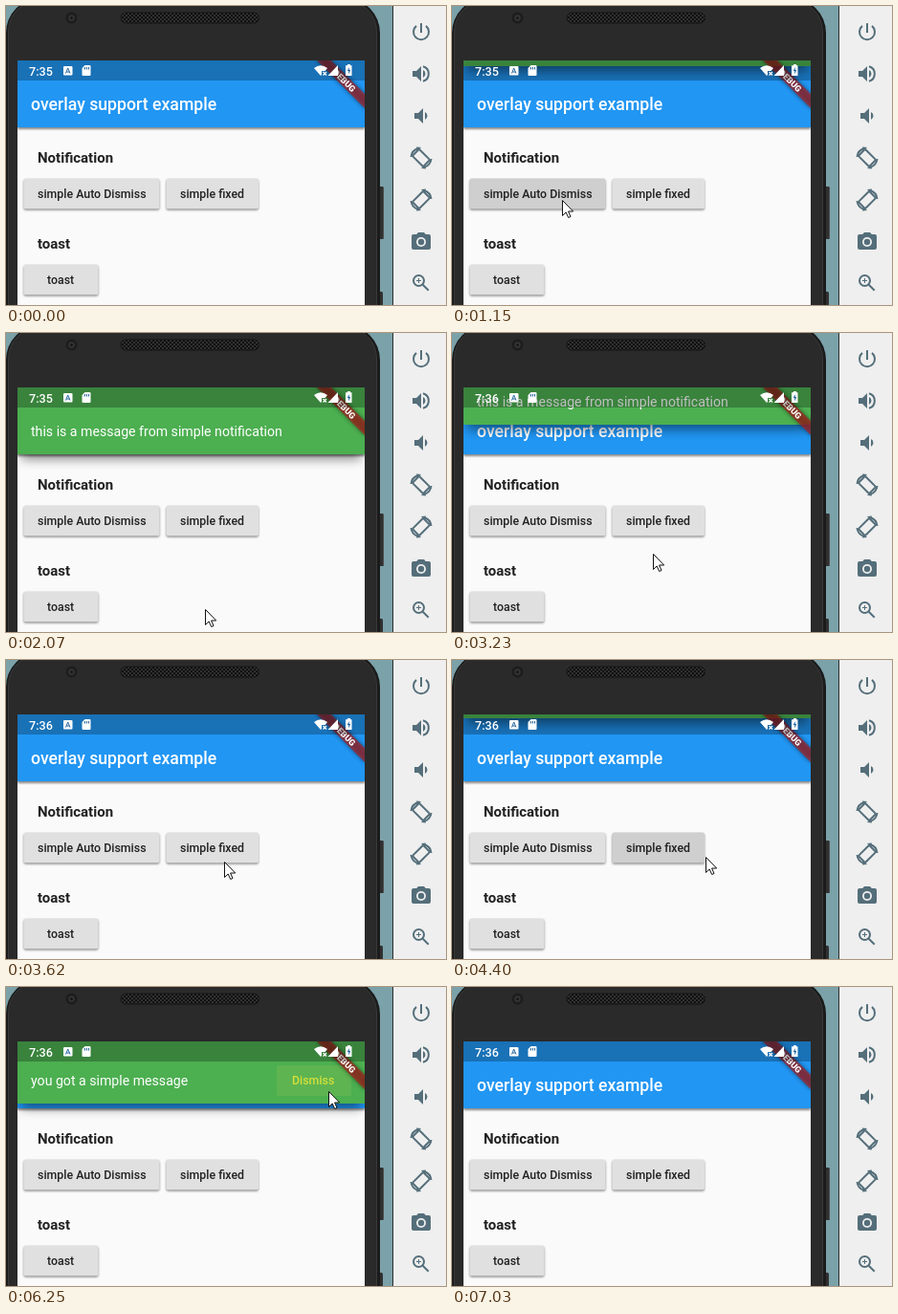
Write an HTML page that moves like this. It is 460 px wide and 313 px high and loops after 7.96 s.

```html
<!DOCTYPE html>
<html lang="en">
<head>
<meta charset="utf-8">
<title>Overlay notification demo</title>
<style>
html, body { margin: 0; width: 100%; height: 100%; overflow: hidden; background: #7ba1a9; }
svg { display: block; width: 460px; height: 313px; font-family: Roboto, Arial, sans-serif; }
.medium { font-weight: 500; }
.button { font-size: 12.36px; font-weight: 500; fill: #212121; }
.heading { font-size: 15px; font-weight: 600; fill: #212121; }
.message { font-size: 14.13px; fill: #fff; }
.line { fill: none; stroke: #546e7a; stroke-width: 2; }
.solid { fill: #546e7a; }
</style>
</head>
<body>
<svg viewBox="0 0 460 313">
  <defs>
    <clipPath id="screen"><rect x="12" y="57" width="363" height="256"/></clipPath>
    <filter id="soft" x="-10%" y="-30%" width="120%" height="180%"><feGaussianBlur stdDeviation="6"/></filter>
    <filter id="near" x="-10%" y="-30%" width="120%" height="160%"><feGaussianBlur stdDeviation="1.3"/></filter>
    <filter id="ribbon" x="-20%" y="-60%" width="140%" height="220%"><feGaussianBlur stdDeviation="2"/></filter>
    <pattern id="mesh" width="4" height="4" patternUnits="userSpaceOnUse">
      <rect width="4" height="4" fill="#101010"/>
      <path d="M0 0L4 4M4 0L0 4" stroke="#3a3a3a" stroke-width=".8"/>
    </pattern>
  </defs>

  <rect width="460" height="313" fill="#7ba1a9"/>
  <g id="phone">
    <rect x="388" y="189" width="7" height="55" rx="1.5" fill="#303030"/>
    <path d="M394.5 190V243" stroke="#4a4a4a"/>
    <rect x="388" y="299" width="6" height="20" rx="1.5" fill="#303030"/>
    <rect x="0" y="-8" width="391" height="360" rx="36" fill="#1b1b1b"/>
    <rect x="2.5" y="-6" width="385" height="360" rx="33" fill="#2a2a2a" stroke="#393939"/>
    <circle cx="68.5" cy="12.5" r="6" fill="#1d1d1d"/>
    <circle cx="68.5" cy="12.5" r="3.2" fill="#353535"/>
    <circle cx="68.5" cy="12.5" r="1.5" fill="#171717"/>
    <rect x="120" y="7" width="144.500" height="11" rx="5.500" fill="url(#mesh)" stroke="#151515"/>
  </g>

  <g clip-path="url(#screen)">
    <rect x="12" y="57" width="363" height="256" fill="#fafafa"/>
    <rect x="12" y="60" width="363" height="69" fill="#000" opacity=".45" filter="url(#near)"/>
    <rect x="12" y="57" width="363" height="70" fill="#2196f3"/>
    <text class="medium" x="26" y="109.200" font-size="17.66" fill="#fff">overlay support example</text>
    <text class="heading" x="33" y="164.300">Notification</text>
    <text class="heading" x="33" y="254.300">toast</text>
    <g id="buttons"></g>

    <g id="notice">
      <rect x="16" y="57" width="355" height="75" fill="#000" opacity=".46" filter="url(#soft)"/>
      <rect x="12" y="57" width="363" height="70" fill="#4caf50"/>
      <text id="message" class="message" x="26" y="107.500"></text>
      <g id="action">
        <rect id="flash" x="283" y="87" width="78" height="32" rx="2" fill="#d6d65a" opacity="0"/>
        <text class="medium" x="299" y="107.400" font-size="12.36" fill="#d3df3a">Dismiss</text>
      </g>
    </g>

    <g transform="translate(375 57) rotate(45)">
      <rect x="-36" y="24.700" width="72" height="10.600" fill="#000" opacity=".5" filter="url(#ribbon)"/>
      <rect x="-36" y="24.700" width="72" height="10.600" fill="#b71c1c" opacity=".627"/>
      <text x="0" y="33.200" font-size="9" font-weight="900" text-anchor="middle" fill="#fff">DEBUG</text>
    </g>

    <rect x="12" y="57" width="363" height="21" fill="#000" opacity=".25"/>
    <g fill="#fff">
      <text id="clock" class="medium" x="24" y="72.500" font-size="12.6"></text>
      <rect x="60" y="63" width="9.500" height="9.500" rx="1"/>
      <path d="M62.500 70.500L64.700 65L67 70.500M63.300 69H66.200" fill="none" stroke="#25669c"/>
      <path d="M82.500 62H87.500Q88.500 62 88.500 63V72Q88.500 73 87.500 73H80.500Q79.500 73 79.500 72V65Z"/>
      <path d="M82.500 64V66.500M84.500 64V66.500M86.500 64V66.500" stroke="#25669c"/>
      <path d="M322 65Q329 59.500 336 65L333.500 68H330V72L329 73Z"/>
      <path d="M331.500 69L335 72.500M335 69L331.500 72.500" stroke="#fff" stroke-width="1.200"/>
      <path d="M347 62V73H336.500Z"/>
      <path d="M357 61H360V62.300H361.500V73H355V62.300H357Z"/>
      <path d="M358.800 64L356.800 68H358.200V71.500L360.200 67H358.800Z" fill="#25669c"/>
    </g>
  </g>

  <g id="panel">
    <rect x="404" width="56" height="313" fill="#efefef"/>
    <path d="M404.500 0V313" stroke="#2b2f30"/>
    <g transform="translate(422 15)"><path class="line" d="M12 3V13M7 5.900A8 8 0 1 0 17 5.900"/></g>
    <g transform="translate(422 59)">
      <path class="solid" d="M3 9V15H7L12 20V4L7 9ZM14 8V16Q16.500 14.800 16.500 12T14 8Z"/>
      <path class="line" d="M14 4.300A8 8 0 0 1 14 19.700"/>
    </g>
    <g transform="translate(422 103)"><path class="solid" d="M5 9V15H9L14 20V4L9 9ZM16 8V16Q18.500 14.800 18.500 12T16 8Z"/></g>
    <g transform="translate(434 159)">
      <rect class="line" x="-8" y="-5" width="16" height="10" rx="1" stroke-width="1.700" transform="rotate(45)"/>
      <path class="line" stroke-width="1.500" d="M-10.500 -1A10.500 10.500 0 0 1 -3 -10M10.500 1A10.500 10.500 0 0 1 3 10"/>
      <path class="solid" d="M-5 -11.500L0 -11L-4 -7ZM5 11.500L0 11L4 7Z"/>
    </g>
    <g transform="translate(434 203) scale(-1 1)">
      <rect class="line" x="-8" y="-5" width="16" height="10" rx="1" stroke-width="1.700" transform="rotate(45)"/>
      <path class="line" stroke-width="1.500" d="M-10.500 -1A10.500 10.500 0 0 1 -3 -10M10.500 1A10.500 10.500 0 0 1 3 10"/>
      <path class="solid" d="M-5 -11.500L0 -11L-4 -7ZM5 11.500L0 11L4 7Z"/>
    </g>
    <g transform="translate(422 235)">
      <path class="solid" d="M9 2L7.200 4H4Q2 4 2 6V18Q2 20 4 20H20Q22 20 22 18V6Q22 4 20 4H16.800L15 2Z"/>
      <circle cx="12" cy="12" r="5" fill="#efefef"/>
      <circle class="solid" cx="12" cy="12" r="3.200"/>
    </g>
    <g transform="translate(422 278)">
      <circle class="line" cx="9.500" cy="9.500" r="5.500"/>
      <path class="line" d="M13.700 13.700L19.700 19.700"/>
      <path class="line" stroke-width="1" style="stroke-width:1" d="M7 9.500H12M9.500 7V12"/>
    </g>
  </g>

  <path id="cursor" d="M.5 .5V16.500L4.200 13L6.700 18.500L9 17.500L6.600 12H11.700Z" fill="#fff" stroke="#111" stroke-linejoin="round"/>
</svg>

<script>
const LOOP = 7960;
const MS_PER_PX = 5;
const HEIGHT = 70;

// Bursts of screen updates: start, end, number of steps.
const BURSTS = [
  [140, 920, 11], [1000, 1770, 11], [2000, 2070, 2], [2700, 3470, 11], [3540, 3940, 6],
  [4090, 4800, 10], [5250, 5870, 9], [6020, 6790, 11], [6860, 7030, 3]
];

// Pointer positions: time, x, y.
const POINTER = [
  [140, 294, 303], [300, 250, 268], [450, 205, 240], [590, 157, 219], [740, 101, 188],
  [920, 113, 200], [1000, 115, 203], [1160, 115, 203], [1770, 205, 271], [2000, 208, 289],
  [2700, 208, 287], [3239, 210, 231], [3470, 219, 222], [3540, 222, 215], [3940, 250, 196],
  [4300, 255, 199], [4405, 265, 206], [4800, 346, 195], [5250, 348, 190], [5700, 333, 103],
  [5870, 335, 106], [6020, 337, 109], [6270, 337, 109], [6790, 419, 254], [6945, 434, 300]
];

const NOTICES = [
  { show: 1124, hide: 3084, text: "this is a message from simple notification" },
  { show: 4386, hide: 6226, text: "you got a simple message", action: true }
];

const BUTTONS = [
  { x: 18.5, y: 180.5, w: 142, textX: 33, label: "simple Auto Dismiss", press: 1040 },
  { x: 167.5, y: 180.5, w: 96.5, textX: 182, label: "simple fixed", press: 4290 },
  { x: 18.5, y: 270.5, w: 78, textX: 43, label: "toast" }
];

const el = id => document.getElementById(id);
const clamp = v => Math.max(0, Math.min(1, v));

el("buttons").innerHTML = BUTTONS.map(({ x, y, w, textX, label }, i) => {
  const box = (dy, rest) => `<rect x="${x}" y="${y + dy}" width="${w}" height="31.8" rx="2" ${rest}/>`;
  return box(1.4, 'opacity=".42" filter="url(#near)"') + box(0, 'fill="#e0e0e0"') +
    box(0, `id="press${i}" opacity="0"`) +
    `<text class="button" x="${textX}" y="${y + 20}">${label}</text>`;
}).join("");

function stepped(t) {
  const burst = BURSTS.filter(b => b[0] <= t).pop();
  if (!burst) return 0;
  const [start, end, count] = burst;
  const gap = (end - start) / (count - 1);
  return start + gap * Math.min(count - 1, Math.floor((t - start + 12) / gap));
}

function pointerAt(t) {
  const next = POINTER.findIndex(p => p[0] > t);
  if (next < 1) return POINTER[POINTER.length - 1].slice(1);
  const [t0, x0, y0] = POINTER[next - 1];
  const [t1, x1, y1] = POINTER[next];
  const k = (t - t0) / (t1 - t0);
  return [x0 + (x1 - x0) * k, y0 + (y1 - y0) * k];
}

// Quick ink rise, short hold, then fade.
const ink = (t, start) => clamp((t - start) / 60) * clamp(1 - (t - start - 130) / 240);

function render(time) {
  const t = stepped(time);

  const [x, y] = pointerAt(t);
  el("cursor").setAttribute("transform", `translate(${Math.round(x)} ${Math.round(y)})`);
  el("cursor").style.display = t >= 140 && t < 7020 ? "" : "none";

  const slide = HEIGHT * MS_PER_PX;
  const notice = NOTICES.find(n => t >= n.show && t < n.hide + slide + 140);
  el("notice").style.display = notice ? "" : "none";
  if (notice) {
    const shown = clamp((t - notice.show) / slide) - clamp((t - notice.hide) / slide);
    el("notice").setAttribute("transform", `translate(0 ${Math.round(HEIGHT * (shown - 1))})`);
    el("message").textContent = notice.text;
    el("action").style.display = notice.action ? "" : "none";
  }

  BUTTONS.forEach((b, i) => {
    if (b.press) el("press" + i).setAttribute("opacity", 0.08 * ink(t, b.press));
  });
  el("flash").setAttribute("opacity", 0.13 * ink(t, 6130));
  el("clock").textContent = t < 3000 ? "7:35" : "7:36";
}

const begin = performance.now();
function tick() {
  render((performance.now() - begin) % LOOP);
  requestAnimationFrame(tick);
}
tick();
</script>
</body>
</html>
```
